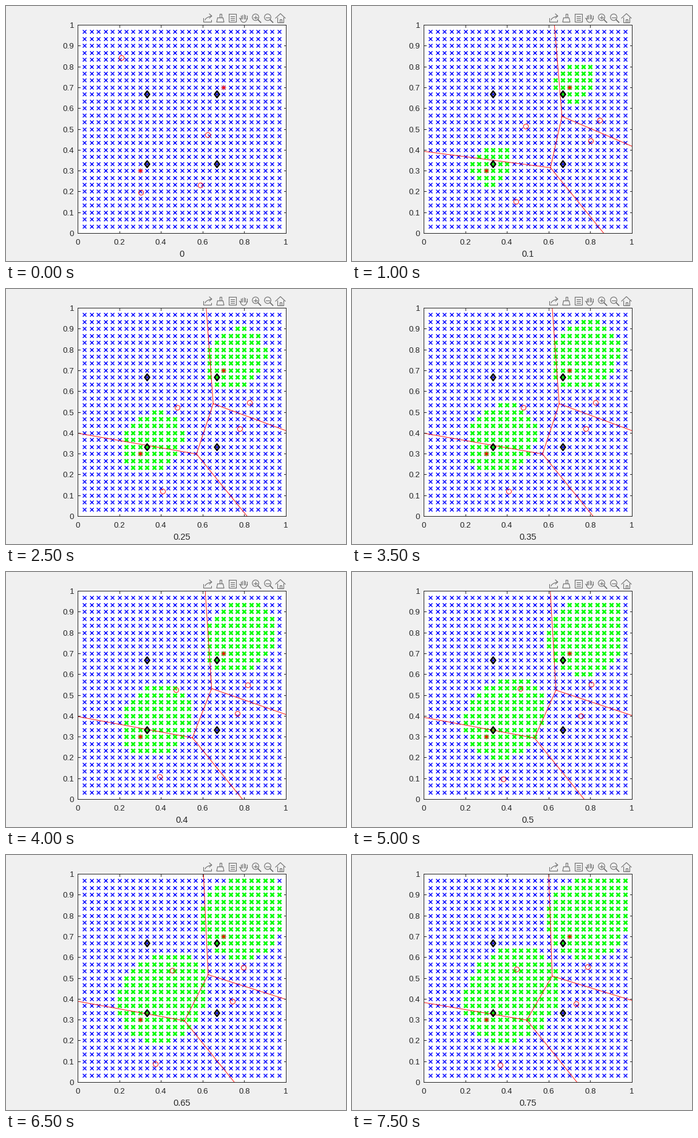
These frames come from a looping animation (560x420 px, 8000 ms). A matplotlib script:

```python
import numpy as np
import matplotlib.pyplot as plt
from matplotlib.animation import FuncAnimation
from matplotlib.patches import Rectangle, Circle
from matplotlib.path import Path

W, H, DPI = 560, 420, 100
STEPS, STEP_MS = 16, 500
LEFT, BOTTOM, SIDE = 118, 374, 343
RIGHT, TOP = LEFT + SIDE, BOTTOM - SIDE
INK, ICON = "#262626", "#6e6e6e"
PT = 72 / DPI

plt.rcParams["font.family"] = "Liberation Sans"
fig = plt.figure(figsize=(W / DPI, H / DPI), dpi=DPI, facecolor="#f0f0f0")
ax = fig.add_axes([0, 0, 1, 1])
ax.set_xlim(0, W)
ax.set_ylim(H, 0)
ax.axis("off")


def px(x):
    return LEFT + SIDE * np.asarray(x)


def py(y):
    return BOTTOM - SIDE * np.asarray(y)


def line(xs, ys, color=INK, width=1.0, **kw):
    return ax.plot(xs, ys, color=color, lw=width * PT, **kw)[0]


def dots(xs, ys, marker, color, size, width, z):
    return ax.plot(xs, ys, ls="", marker=marker, ms=size * PT, mfc="none",
                   mec=color, mew=width * PT, zorder=z)[0]


def label(x, y, text, size=13.33, **kw):
    return ax.text(x, y, text, size=size * PT, color=INK, **kw)


# --- axes box, ticks and labels ---
box = Rectangle((LEFT, TOP), SIDE, SIDE, fc="white", ec="none", zorder=0)
ax.add_patch(box)
ax.add_patch(Rectangle((LEFT, TOP), SIDE, SIDE, fc="none", ec=INK, lw=PT, zorder=6))
for v in np.arange(11) / 10:
    for x, d in ((LEFT, 3.5), (RIGHT, -3.5)):
        line([x, x + d], [py(v)] * 2, zorder=6)
    label(112.3, py(v) + 0.5, f"{v:g}", ha="right", va="center_baseline")
for v in np.arange(6) / 5:
    for y, d in ((BOTTOM, -3.5), (TOP, 3.5)):
        line([px(v)] * 2, [y, y + d], zorder=6)
    label(px(v), 393, f"{v:g}", ha="center", va="baseline")
clock = label(289.7, 413, "", 14.67, ha="center", va="baseline")


# --- toolbar icons ---
def stroke(*pts, width=1.1):
    xs, ys = zip(*pts)
    line(xs, ys, ICON, width)


def lens(x, plus):
    ax.add_patch(Circle((x, 18.5), 5.3, fc="none", ec=ICON, lw=1.1 * PT))
    stroke((x + 4, 22.5), (x + 8.5, 27), width=1.7)
    stroke((x - 2.7, 18.5), (x + 2.7, 18.5))
    if plus:
        stroke((x, 15.8), (x, 21.2))


s = np.linspace(0, 1, 12)
# share
stroke((325, 20), (325, 26), (338, 26), (338, 23))
stroke(*zip(328 + 10 * s, 23 - 6.5 * s ** 0.5))
stroke((335, 13), (339, 16.5), (335, 20))
# brush
stroke((351.5, 19), (351.5, 13), (354.5, 13), (354.5, 19))
stroke((348.5, 19.5), (357.5, 19.5), (359, 26.5), (347, 26.5), (348.5, 19.5))
# data tip
stroke((367, 13), (379, 13), (379, 26), (367, 26), (367, 13))
for y in (17, 20, 23):
    stroke((370, y), (376, y))
# hand
for i in range(5):
    stroke((387 + 2.4 * i, 21), (387 + 2.4 * i, 14 + 0.6 * (i - 2) ** 2))
stroke(*zip(391.5 - 5.2 * np.cos(np.pi * s), 21 + 6 * np.sin(np.pi * s)))
stroke((386.5, 22), (384.5, 20))
lens(411, True)
lens(431, False)
# home
stroke((444, 20), (452, 12.5), (460, 20))
stroke((447, 19), (447, 27), (457, 27), (457, 19))
stroke((450.5, 27), (450.5, 22), (453.5, 22), (453.5, 27))

# --- fixed markers ---
gi, gj = np.meshgrid(np.arange(1, 30), np.arange(1, 30))
dots(px(gi.ravel() / 30), py(gj.ravel() / 30), "x", "blue", 6, 1.4, 1)

diamond = Path([(0, 1), (0.76, 0), (0, -1), (-0.76, 0), (0, 1)], closed=True)
third = np.array([1, 2, 1, 2]) / 3
dots(px(third), py(np.sort(third)), diamond, "black", 10.5, 2.5, 4)

rays = [(np.cos(a), np.sin(a)) for a in np.arange(8) * np.pi / 4]
star = Path([p for r in rays for p in ((0, 0), r)], [Path.MOVETO, Path.LINETO] * 8)
SEEDS = (9, 21)
dots(px(np.array(SEEDS) / 30), py(np.array(SEEDS) / 30), star, "red", 8, 1, 4)


# --- cells lit by a front that drifts along the diagonal as it grows ---
def front(k):
    drift, reach = 0.54 * k ** 0.705, 2.25 * k ** 0.41
    rim = (gi == 29) | (gj == 29)
    limit = np.maximum(reach - 0.8 * rim, 0) ** 2
    lit = np.zeros(gi.shape, bool)
    for seed in SEEDS:
        x, y = gi - seed - drift, gj - seed - drift
        lit |= x * x + y * y - 0.3 * x * y < limit
    return lit


lit_at = np.logical_or.accumulate([front(k) for k in range(STEPS)])
cells = dots([], [], "x", "lime", 6.2, 2.6, 3)

# --- four agents and the borders between them, in pixels ---
REST = np.array([(190, 84.5), (332, 212), (320, 295), (222, 307)])
BEGIN = np.array([(286, 198), (407.5, 188), (393, 222), (270, 322)])
END = np.array([(271, 188), (387.5, 184), (369, 244.5), (244, 345.5)])
BEND = np.array([[-0.3], [0], [0], [0.6]])
agents = dots([], [], "o", "red", 8, 0.9, 5)
borders = line([], [], "red", 0.9, zorder=3.5)
borders.set_clip_path(box)


def places(k):
    """Agents leap from rest, then move on every 2.4 steps."""
    if k == 0:
        return REST
    u = np.floor((k - 0.1) / 2.4) / 6
    return BEGIN + (END - BEGIN) * u * (1 + BEND - BEND * u)


def meet(a, b, c):
    """Point equally far from a, b and c."""
    return np.linalg.solve(2 * np.array([b - a, c - a]),
                           [b @ b - a @ a, c @ c - a @ a])


def ray(start, a, b, toward):
    d = np.array([b[1] - a[1], a[0] - b[0]])
    d = d / np.hypot(*d) * np.sign(d @ toward)
    return [start, start + 600 * d, (np.nan, np.nan)]


def split(a, b, c, d):
    v, w = meet(a, b, c), meet(a, c, d)
    return np.array([v, w, (np.nan, np.nan)]
                    + ray(v, a, b, (0, -1)) + ray(v, b, c, (1, 0))
                    + ray(w, a, d, (-1, 0)) + ray(w, c, d, (0, 1)))


def draw(k):
    lit = lit_at[k]
    cells.set_data(px(gi[lit] / 30), py(gj[lit] / 30))
    spots = places(k)
    agents.set_data(*spots.T)
    borders.set_data(*(split(*spots).T if k else ([], [])))
    clock.set_text(f"{0.05 * k:.2g}")
    return cells, agents, borders, clock


anim = FuncAnimation(fig, draw, frames=STEPS, interval=STEP_MS,
                     repeat=True, repeat_delay=0, blit=False)
plt.show()
```
